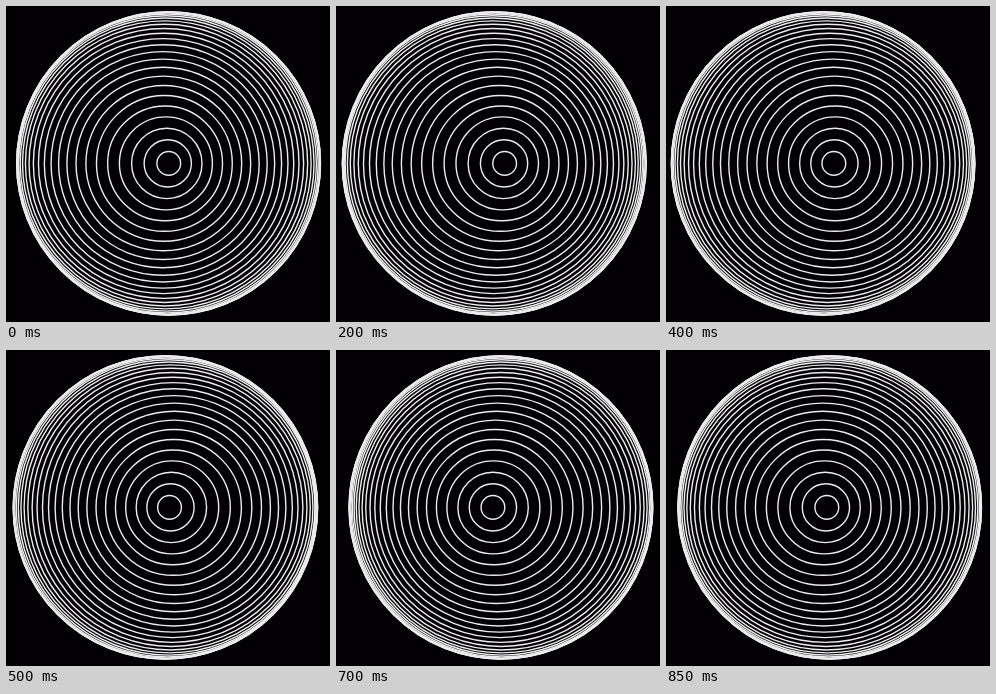
An HTML page with a canvas that plays this animation: 324x316 px, repeating every 900 ms.

```html
<!DOCTYPE html>
<html lang="en">
<head>
<meta charset="utf-8">
<title>Rippling rings</title>
<style>
  html, body { margin: 0; width: 100%; height: 100%; overflow: hidden; background: #020003; }
  canvas { display: block; width: 324px; height: 316px; }
</style>
</head>
<body>
<canvas id="stage" width="324" height="316"></canvas>
<script>
  const ctx = document.getElementById('stage').getContext('2d');
  const LOOP = 900, STEP = 50;
  const RINGS = 25, RING_ANGLE = 2.59;        // latitude circles of a sphere, in degrees
  const CAMERA = 2, RADIUS = 151.7, CENTER_Y = 157.4;
  const FOCUS = RADIUS * Math.sqrt(CAMERA * CAMERA - 1);
  const rad = deg => deg * Math.PI / 180;

  function draw(ms) {
    const turn = Math.floor(ms % LOOP / STEP) * STEP / LOOP * 360;
    const wave = turn + 13 * Math.cos(rad(turn + 32));
    ctx.fillStyle = '#020003';
    ctx.fillRect(0, 0, 324, 316);
    ctx.strokeStyle = '#ececec';
    ctx.lineWidth = 1.4;
    for (let ring = 1; ring <= RINGS; ring++) {
      const angle = rad(ring * RING_ANGLE);
      const scale = 1 / (CAMERA - Math.cos(angle));
      // Each ring sways a little later than the one inside it.
      const sway = 6.3 * Math.cos(rad(wave - 105 - 9 * (ring - 1)));
      const x = 156.4 + scale * (6.8 + sway);
      ctx.beginPath();
      ctx.arc(x, CENTER_Y, FOCUS * scale * Math.sin(angle), 0, 2 * Math.PI);
      ctx.stroke();
    }
  }

  const start = performance.now();
  function tick() {
    draw(performance.now() - start);
    requestAnimationFrame(tick);
  }
  tick();
</script>
</body>
</html>
```
